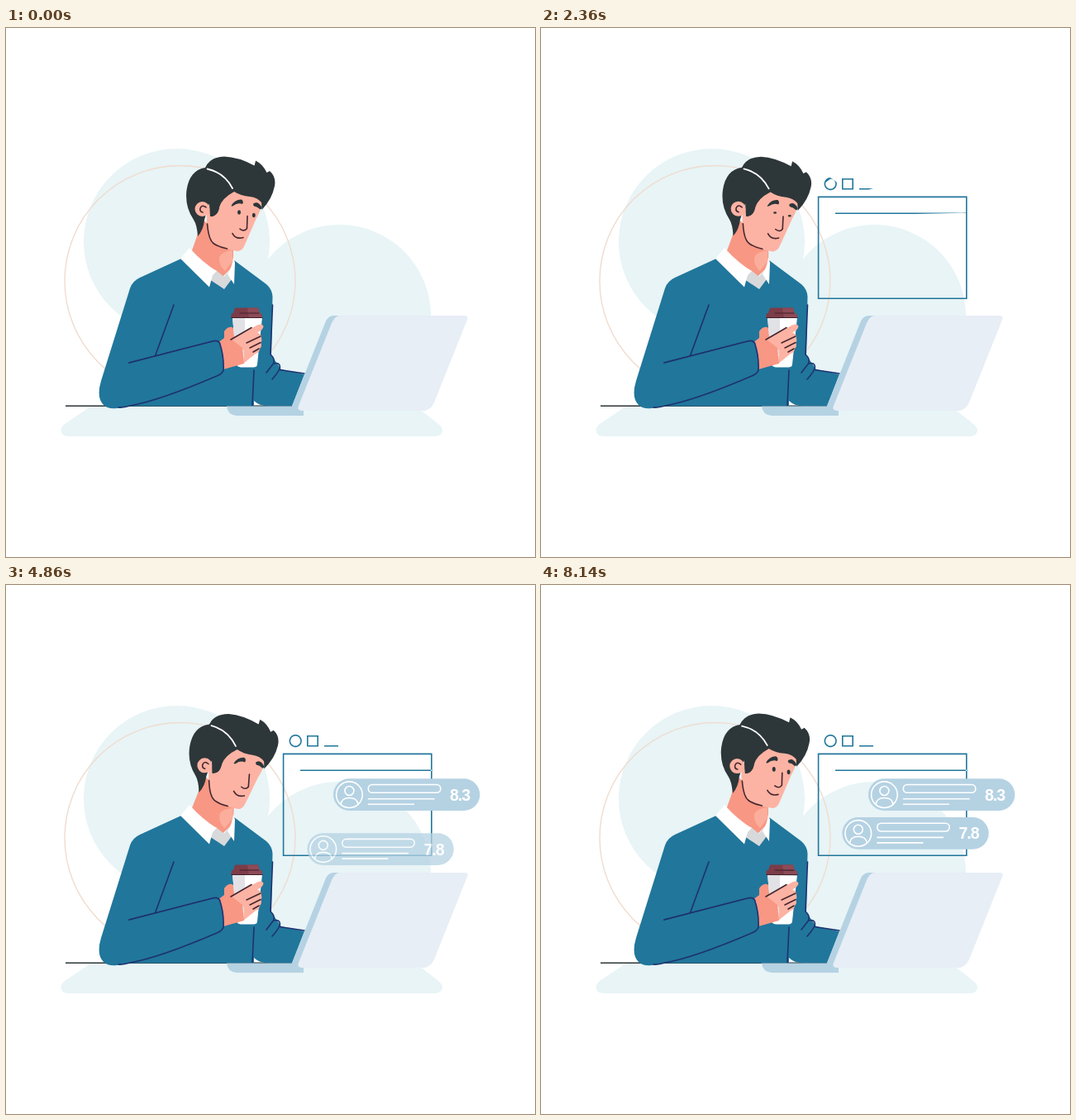
An HTML page that plays this animation: 640x640 px, repeating every 8.21 s.

```html
<!DOCTYPE html>
<html lang="en">
<head>
<meta charset="utf-8">
<style>
  html, body { margin: 0; width: 100%; height: 100%; overflow: hidden; background: #fff; }
  svg { display: block; width: 100%; height: 100%; }
  .line { fill: none; stroke-linecap: round; stroke-linejoin: round; stroke-width: 1.6; }
  .navy { stroke: #1d3270; }
  .ink { stroke: #45262f; }
  .pill text { font: bold 19.5px "Liberation Sans", Arial, sans-serif; letter-spacing: -1px; fill: #fff; }
</style>
</head>
<body>
<svg viewBox="0 0 640 640">
  <g fill="#e8f4f6">
    <circle cx="206.5" cy="258.5" r="112.5"/>
    <circle cx="403.5" cy="348.5" r="110.5"/>
  </g>
  <circle cx="210.5" cy="306" r="139.5" fill="none" stroke="#f0dccf" stroke-width="1.4"/>
  <path id="browser" fill="#21769b" fill-rule="evenodd"/>
  <g id="pills"></g>

  <path fill="#e8f4f6" d="M104 457L71 479Q64 485 68 491Q70 494 76 494H519Q527 494 528 487Q528 483 523 479L500 461V457Z"/>
  <path d="M72 457.3H346" stroke="#2d3639" stroke-width="1.5"/>

  <g id="head">
    <path fill="#f89783" d="M238 232L224 272Q232 292 262 301L275 288V262Z"/>
    <path fill="#fcae9c" d="M258 277Q262 270 274 269V282L265 294Q257 287 258 277Z"/>
    <path fill="#fdb3a3" d="M243 222Q242 240 245 252Q249 263 267 267.5L280 270Q286 270 289 262L303 230Q311 216 309 208L278 194L252 208Z"/>
    <path fill="#2d3639" d="M232 252Q231 238 227 232Q216 216 218.500 196Q222 172 241 169Q247 156 264 155.500Q281 156 300.500 166.500L302 160.500Q311 165 315.500 175L319 173Q327 180 325 191Q322 207 309.500 220L309 211Q304 205 295 204Q284 203 276 198Q261 206 258 217Q256 228 247 228L246 212L240 232Q239 244 232 252Z"/>
    <circle cx="237.500" cy="219" r="9" fill="#fdb3a3"/>
    <path fill="#2d3639" d="M246 210L258 206L258 217Q256 228 247.500 228Z"/>
    <path class="line ink" d="M242 217Q237 213 235 218Q234 222 238 223"/>
    <path class="line" stroke="#fff" style="stroke-width:1.8" d="M243.500 170.500Q264 175 274 194"/>
    <path class="line ink" d="M243.500 237Q245 256 251 260.500Q257 265 267.500 267"/>
    <path fill="#2d3639" d="M272.500 215Q277 207 285 207.500Q288 210 286 213Q280 211 275 215Q273 216 272.500 215ZM300 212Q305 209 309.500 217Q309 220 307 219Q304 216 300 215.500Q298 213 300 212Z"/>
    <g fill="#2d3639">
      <ellipse class="eye" cx="282" cy="223" rx="2" ry="2.800"/>
      <ellipse class="eye" cx="299.800" cy="226.500" rx="2" ry="2.800"/>
    </g>
    <path class="line ink" d="M292 227.500L291.500 242.500Q288 247 283 243M274 248.500Q278 256 287 253.500"/>
  </g>

  <path fill="#21769b" d="M212 279L162 302Q153 306 150 315L115 427Q109 447 118 456Q124 461.500 134 460L150 457.500H300V451Q306 457 318 457.500H346L361 419L333 413L321 396L322.500 325Q322 316 315 310L276 281L264 315Z"/>
  <path fill="#d8d9db" d="M246 304L254 293L264 301L269 295L273 304L264 316Z"/>
  <path fill="#fff" d="M222 266L211 279L246 313.500L250 299L255 294Q238 284 222 266ZM275 277L277 284L276 310L268 298Q274 288 275 277Z"/>
  <path class="line navy" d="M203 335L180 398M149 405L250 379M300 414L298 457M322.500 335L320 395Q326 400 323.500 406L315 417M323.500 406Q331 404 331.500 410Q331 415 322 425M331 413.500L361 418"/>

  <g id="cup">
    <path fill="#f89783" d="M264 412L256 381L264 375V367Q268 361 274 362L284 376L289 402Z"/>
    <path fill="#fff" d="M274 350H310L304 407Q304 410 300 410.500H284Q280 410 279 407Z"/>
    <path fill="#e2e2e6" d="M274 350H289V392L279 405Z"/>
    <path fill="#7c3c48" d="M277 338.500H305L307 345H309L310.500 350.500H272L273 345H275Z"/>
    <path fill="#8c4b57" d="M292 338.500H305L307 345H309L310.500 350.500H294Z"/>
    <path class="line" stroke="#40202c" style="stroke-width:1.200" d="M283 345H306M273 350.500H310"/>
    <path fill="#fdb3a3" d="M271 377L304 359.500Q310 357 311.500 361Q311 365 304 368.500Q310 371 309 375Q310 378 308.500 381Q310 385 307 388Q307 392 302 394L287 406L288 390Z"/>
    <path fill="#f89783" d="M257 381L272 376L286 387L288 406L263 413Z"/>
    <path class="line ink" d="M272 377L297 362.500M291 381L308 373M295 387L308 380.500M299 392L306 388"/>
  </g>

  <path fill="#21769b" d="M149 406L250 379Q257 377 259 381Q264 398 263 414Q262 418 255 421Q185 451 150 457L136 459Z"/>
  <path class="line navy" d="M149 405L250 379Q256 377 258.500 381Q264 398 263 414Q262 418 255 421Q185 451 150 457Q142 459.500 136 459"/>

  <path fill="#b5d2e3" d="M267 457.500H346L386 357Q389 348 397 348H410L360 462V469H279Q268 468 267 457.500Z"/>
  <path fill="#e7eef6" d="M404 348H555Q560 348 558 353L518 453Q514 462 506 463H357Q352 462 354 457L394 357Q398 348 404 348Z"/>
</svg>
<script>
const LOOP = 8210, CYCLE = 2237;
const $ = s => document.querySelector(s);
const clamp = x => Math.min(1, Math.max(0, x));
const smooth = x => (x = clamp(x), x * x * (3 - 2 * x));
const bump = (t, start, end) => Math.sin(Math.PI * clamp((t - start) / (end - start))) ** 2;

// Closed outlines; growing holes run the opposite way round.
const outer = (l, t, r, b) => [[r, t], [l, t], [l, b], [r, b]];
const inner = (l, t, r, b) => [[r, b], [l, b], [l, t], [r, t]];
const frame = (l, t, r, b, w) => [outer(l, t, r, b), inner(l + w, t + w, r - w, b - w)];
const ring = (cx, cy, r, dir) => Array.from({ length: 48 }, (_, i) => {
  const a = dir * i * Math.PI / 24;
  return [cx + r * Math.sin(a), cy - r * Math.cos(a)];
});
const outlines = [
  ...frame(334.8, 203.6, 515.6, 328, 1.6),
  ...frame(364, 182, 378, 195.6, 1.6),
  ring(350.2, 188.6, 7.6, -1), ring(350.2, 188.6, 6, 1),
  outer(356, 223.5, 515, 225.1),
  outer(385, 194, 402, 195.6)
];

function trim(points, part) {
  const closed = [...points, points[0]];
  const lengths = points.map((p, i) => Math.hypot(closed[i + 1][0] - p[0], closed[i + 1][1] - p[1]));
  let left = part * lengths.reduce((a, b) => a + b);
  let d = 'M' + points[0];
  for (let i = 0; i < points.length && left > 0; i++) {
    const k = Math.min(1, left / lengths[i]), [x, y] = closed[i], [x2, y2] = closed[i + 1];
    d += `L${x + (x2 - x) * k} ${y + (y2 - y) * k}`;
    left -= lengths[i];
  }
  return d + 'Z';
}

const pills = [
  { x: 0, y: 0, score: '8.3', start: 2600, length: 1000, rise: 82 },
  { x: -31.6, y: 46.7, score: '7.8', start: 4440, length: 900, rise: 35 }
];
$('#pills').innerHTML = pills.map(p => `<g class="pill">
  <rect x="396" y="234.3" width="177.300" height="38.700" rx="19.350" fill="#b5d2e3"/>
  <g fill="none" stroke="#fff" stroke-width="1.600" stroke-linecap="round">
    <circle cx="415.400" cy="253.700" r="15.800"/><circle cx="415.400" cy="249" r="5.500"/>
    <path d="M405 265.500Q406 257.500 415.400 257.500Q425 257.500 426 265.500M438.500 258.700H518M438.500 265.200H493.500"/>
    <rect x="438.300" y="241.500" width="87.500" height="9.800" rx="4.900"/>
  </g>
  <text x="537" y="260.700">${p.score}</text></g>`).join('');
const pillNodes = document.querySelectorAll('.pill');
const eyes = document.querySelectorAll('.eye');

function draw(now) {
  const t = now % LOOP;
  const beat = (t + 80) % CYCLE - 80;

  const grown = clamp((t + 38) / 2998);
  $('#browser').setAttribute('d', outlines.map(o => trim(o, grown)).join(''));

  $('#head').setAttribute('transform', `rotate(${2.7 * bump(beat, -80, 800) - 0.2} 255 285)`);
  $('#cup').setAttribute('transform', `rotate(${1.7 * bump(beat, 400, 1500)} 262 396)`);
  const open = beat < 400 ? 1 - smooth((beat + 40) / 300) : smooth((beat - 420) / 480);
  eyes.forEach(e => e.setAttribute('ry', 2.8 * open));

  pills.forEach((p, i) => {
    const age = t - p.start;
    const y = p.y + p.rise * (1 - smooth(age / p.length));
    pillNodes[i].setAttribute('transform', `translate(${p.x} ${y})`);
    pillNodes[i].setAttribute('opacity', clamp(age / 560));
  });
}

const began = performance.now();
(function tick() {
  draw(performance.now() - began);
  requestAnimationFrame(tick);
})();
</script>
</body>
</html>
```
